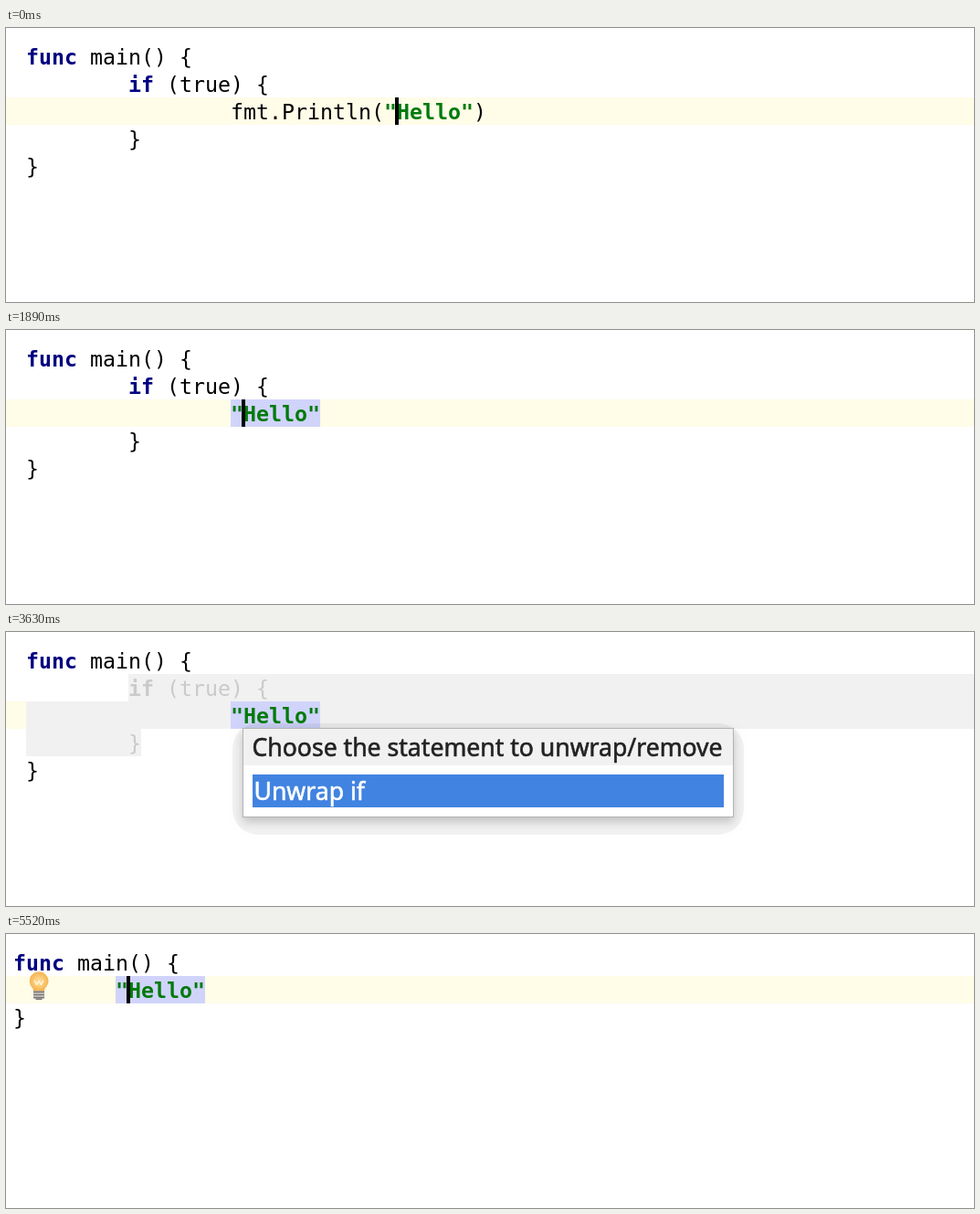
These frames come from a looping animation (1060 px wide and 300 px high, 5.55 s). An HTML page with a canvas:

```html
<!DOCTYPE html>
<html lang="en">
<head>
<meta charset="utf-8">
<title>Unwrap statement</title>
<style>
  html, body { margin: 0; width: 100%; height: 100%; overflow: hidden; background: #fff; }
  canvas { display: block; }
</style>
</head>
<body>
<canvas id="stage" width="1060" height="300"></canvas>
<script>
const ctx = document.getElementById('stage').getContext('2d');
const LOOP = 5550, CELL = 14, LINE = 30, TOP = 16;
const CODE_FONT = '23.25px "DejaVu Sans Mono", monospace';
const MENU_FONT = '26.6px "Noto Sans", sans-serif';
const BLACK = '#000', KEYWORD = '#000080', STRING = '#007a0c', FADED = '#cacaca';
const CURRENT = '#fffce8', REMOVED = '#f1f1f1', KEPT = '#d0d4fb', SELECTED = '#4183e0';
const CALL_MENU = ['Unwrap "Hello"', 'Unwrap if'], BLOCK_MENU = ['Unwrap if'];

// Each scene holds from its start time until the next one begins.
const scenes = [
  { start: 0, stage: 'call', caret: true },
  { start: 210, stage: 'call', caret: true, bulb: true },
  { start: 450, stage: 'call', bulb: true, menu: CALL_MENU, blank: true },
  { start: 510, stage: 'call', preview: true, menu: CALL_MENU },
  { start: 1500, stage: 'block', caret: true },
  { start: 2580, stage: 'block', menu: BLOCK_MENU, blank: true },
  { start: 2640, stage: 'block', preview: true, menu: BLOCK_MENU },
  { start: 3690, stage: 'plain', caret: true },
  { start: 3990, stage: 'plain', caret: true, left: 8 },
  { start: 5200, stage: 'plain', caret: true, left: 8, bulb: true }
];

function rect(x, y, w, h, color) {
  ctx.fillStyle = color;
  ctx.fillRect(x, y, w, h);
}

function roundRect(x, y, w, h, radius, color) {
  ctx.fillStyle = color;
  ctx.beginPath();
  ctx.roundRect(x, y, w, h, radius);
  ctx.fill();
}

// A hairline outline gives the menu text its slightly heavier weight.
function label(text, x, y, color) {
  ctx.font = MENU_FONT;
  ctx.fillStyle = ctx.strokeStyle = color;
  ctx.lineWidth = 0.6;
  ctx.lineJoin = 'round';
  ctx.fillText(text, x, y);
  ctx.strokeText(text, x, y);
}

function drawBulb(x, y) {
  const glow = ctx.createRadialGradient(x, y + 1, 1, x, y, 11);
  glow.addColorStop(0, '#ffdf9c');
  glow.addColorStop(1, '#f4b04b');
  ctx.fillStyle = glow;
  ctx.beginPath();
  ctx.arc(x, y, 10.3, Math.PI * 0.82, Math.PI * 0.18);
  ctx.bezierCurveTo(x + 7, y + 8, x + 6, y + 8, x + 6, y + 11);
  ctx.lineTo(x - 6, y + 11);
  ctx.bezierCurveTo(x - 6, y + 8, x - 7, y + 8, x - 8.7, y + 5.5);
  ctx.fill();

  ctx.strokeStyle = '#fff6df';
  ctx.lineWidth = 1.4;
  ctx.beginPath();
  ctx.moveTo(x - 5, y - 1);
  ctx.lineTo(x - 2.5, y + 4);
  ctx.lineTo(x, y);
  ctx.lineTo(x + 2.5, y + 4);
  ctx.lineTo(x + 5, y - 1);
  ctx.stroke();

  for (let i = 0; i < 3; i++) rect(x - 6, y + 11 + i * 3, 12, 2, '#77777b');
  rect(x - 3.5, y + 19, 7, 1.5, '#77777b');
}

function drawMenu(x, items, blank) {
  const y = 105, width = 538, height = 62 + items.length * 36;
  roundRect(x - 11, y - 5, width + 22, height + 24, 28, 'rgba(0, 0, 0, 0.05)');
  ctx.save();
  ctx.shadowColor = 'rgba(0, 0, 0, 0.2)';
  ctx.shadowBlur = 10;
  ctx.shadowOffsetY = 5;
  rect(x, y, width, height, '#b3b3b3');
  ctx.restore();
  rect(x + 1, y + 1, width - 2, height - 2, '#f1f1f1');
  if (blank) return;

  rect(x + 1, 146, width - 2, y + height - 147, '#fff');
  label('Choose the statement to unwrap/remove', x + 10.5, 136, '#222');
  rect(x + 11, 156, 516, 36, SELECTED);
  if (items.length > 1) {
    ctx.strokeStyle = '#979088';
    ctx.lineWidth = 2;
    ctx.strokeRect(x + 12, 157, 514, 34);
  }
  items.forEach((item, i) => label(item, x + 12.5, 184 + i * 36, i ? '#222' : '#fff'));
}

function drawScene({ stage, caret, bulb, menu, blank, preview, left = 22 }) {
  const isCall = stage === 'call', isPlain = stage === 'plain';
  const row = isPlain ? 1 : 2, indent = isPlain ? 8 : 16;
  const quote = isCall ? 28 : indent;
  const columnX = column => left + column * CELL;
  const rowY = line => TOP + line * LINE;
  const mark = (line, from, to, color) =>
    rect(columnX(from), rowY(line), (to - from) * CELL, LINE, color);
  const code = (line, column, text, color = BLACK, bold = false) => {
    ctx.font = (bold ? 'bold ' : '') + CODE_FONT;
    ctx.fillStyle = color;
    ctx.fillText(text, columnX(column), rowY(line) + 23.5);
  };

  rect(0, 0, 1060, 300, '#fff');
  rect(0, rowY(row), 1060, LINE, CURRENT);
  if (preview && isCall) mark(2, 16, 36, REMOVED);
  if (preview && !isCall) {
    mark(1, 8, 75, REMOVED);
    mark(2, 0, 75, REMOVED);
    mark(3, 0, 9, REMOVED);
  }
  if (preview || !isCall) mark(row, quote, quote + 7, KEPT);

  code(0, 0, 'func', KEYWORD, true);
  code(0, 5, 'main() {');
  if (!isPlain) {
    const faded = preview && !isCall;
    code(1, 8, 'if', faded ? FADED : KEYWORD, true);
    code(1, 11, '(true) {', faded ? FADED : BLACK);
    code(3, 8, '}', faded ? FADED : BLACK);
  }
  if (isCall) {
    const color = preview ? FADED : BLACK;
    code(2, 16, 'fmt.Println(', color);
    code(2, 35, ')', color);
  }
  code(row, quote, '"Hello"', STRING, true);
  code(isPlain ? 2 : 4, 0, '}');

  if (bulb) drawBulb(left + 28, rowY(row) + 5.5);
  if (caret) rect(columnX(quote + 1) - 2, rowY(row), 4, LINE, BLACK);
  if (menu) drawMenu(columnX(quote + 1) - 1, menu, blank);
}

const begin = performance.now();
function frame() {
  const time = (performance.now() - begin) % LOOP;
  drawScene(scenes.findLast(scene => scene.start <= time));
  requestAnimationFrame(frame);
}
frame();
</script>
</body>
</html>
```
